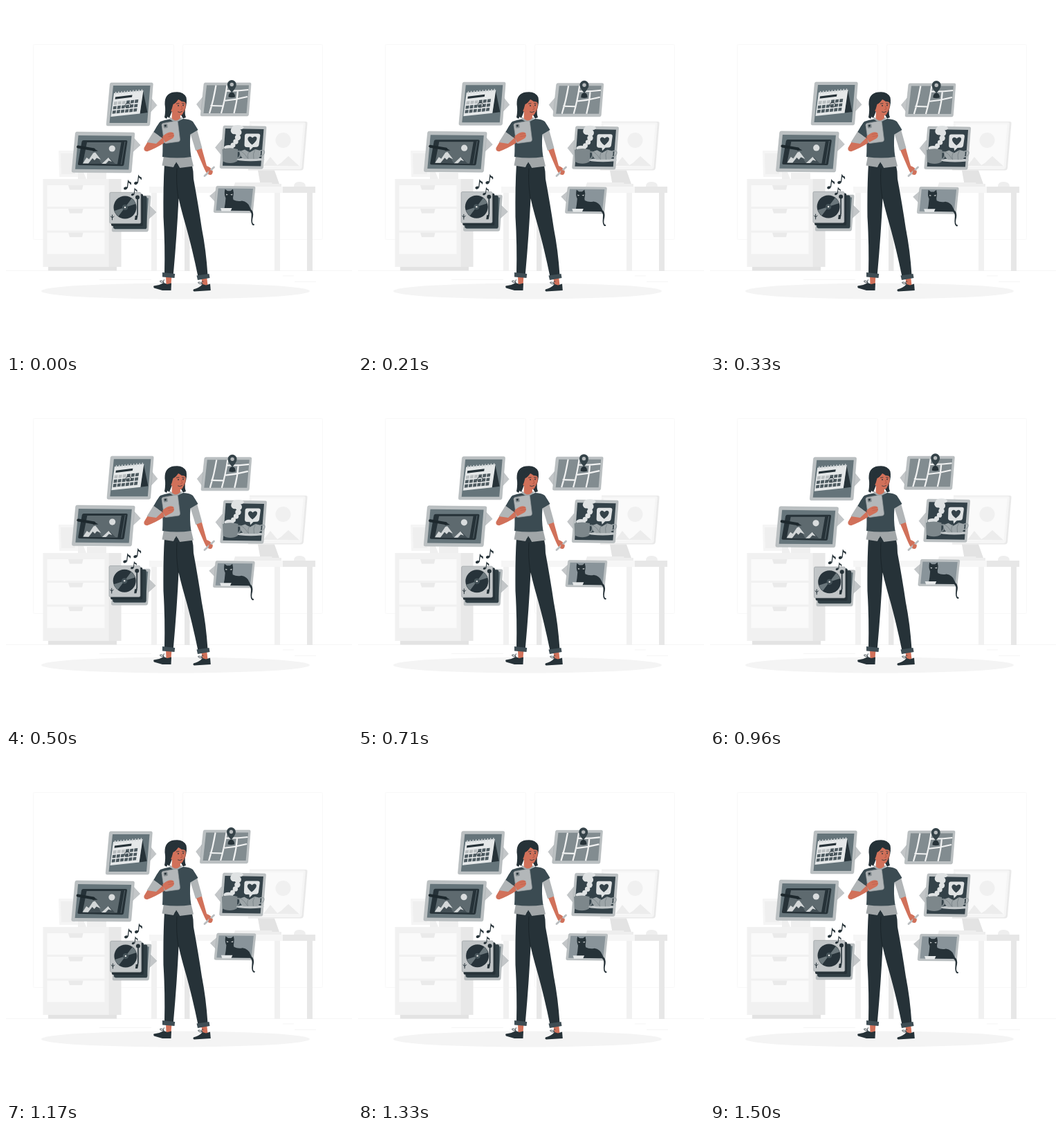
Recreate the animation shown at these times as an HTML page. Size 500 by 500 pixels, loop 1.54 s.

```html
<!DOCTYPE html>
<html lang="en">
<head>
<meta charset="utf-8">
<title>Floating posts</title>
<style>
html, body { margin: 0; width: 100%; height: 100%; overflow: hidden; background: #fff; }
svg { display: block; width: 100%; height: 100%; }
.rim { fill: #bbc0c2; stroke: #a5abad; stroke-width: .5; stroke-linejoin: round; }
.tick { fill: #c3c6c8; stroke: #adb2b4; stroke-width: .5; stroke-linejoin: round; }
.ink { fill: #263238; }
.shirt { fill: #3b4b52; }
.skin { fill: #d1715a; }
.line { fill: none; stroke-linecap: round; stroke-linejoin: round; }
</style>
</head>
<body>
<svg viewBox="0 0 500 500" xmlns="http://www.w3.org/2000/svg">
<defs>
  <g id="note">
    <ellipse cx="0" cy="0" rx="2.7" ry="2" transform="rotate(-18)" class="ink"/>
    <path d="M2 -.5L3.500 -12.500Q5 -9 8 -8.500Q8.800 -6.500 7.700 -4.500Q7 -7 4.200 -8L3.200 0Z" class="ink"/>
  </g>
</defs>

<!-- room -->
<g fill="none" stroke="#f8f8f8">
  <rect x="39.500" y="55.500" width="203" height="282" rx="2"/>
  <rect x="255.500" y="55.500" width="202" height="282" rx="2"/>
</g>
<path d="M0 382.500H500M135 395.500H210M400 390H416M417 398.500H448" stroke="#f5f5f5" fill="none"/>
<ellipse cx="245" cy="412" rx="194" ry="11.500" fill="#f4f4f4"/>

<!-- cabinet -->
<path d="M76 209H104L106 247H77Z" fill="#f5f5f5"/>
<path d="M79 213H100V243H80Z" fill="#efefef"/>
<path d="M104 240H112L116 250H104ZM117 241H145V250H117Z" fill="#efefef"/>
<path d="M61 376H160V382.500H61Z" fill="#e3e3e3"/>
<path d="M148 250H166.500V377H148Z" fill="#e8e8e8"/>
<path d="M53.500 250H148.500V377H53.500Z" fill="#f1f1f1"/>
<path d="M59.500 259H142.500V290H59.500ZM59.500 293H142.500V324.500H59.500ZM59.500 327.500H142.500V358.500H59.500Z" fill="#fafafa"/>
<path d="M90 259H111.500L110 265.500H92ZM90 293H111.500L110 299.500H92ZM90 327.500H111.500L110 334H92Z" fill="#eaeaea"/>

<!-- desk and monitor -->
<path d="M352 167H433Q436 167 435.500 170L430 234Q429.500 237.500 426 237.500H350Z" fill="#e9e9e9"/>
<path d="M352 168H430.500Q433 168 432.700 170.500L427.500 233Q427 236 424 236H350Z" fill="#f5f5f5"/>
<path d="M355 171H429.500L424.500 232H352Z" fill="#fafafa"/>
<circle cx="400.500" cy="194" r="11" fill="#f0f0f0"/>
<path d="M372 231L382 218L392 230L397 227L408 217L424 231.500Z" fill="#ececec"/>
<path d="M364 237.500H388L396 260H368Z" fill="#e3e3e3"/>
<path d="M331 255H384L386 261H329ZM367 257H398V261H367ZM416 261Q416 254 424 254Q433 254 433 261Z" fill="#eeeeee"/>
<path d="M210 270H218V383H210ZM388 270H396V383H388Z" fill="#f1f1f1"/>
<path d="M258 270H265.500V383H258ZM435 270H443V383H435Z" fill="#e7e7e7"/>
<path d="M207 261H400V270H207Z" fill="#f6f6f6"/>
<path d="M400 261H447V270H400Z" fill="#e7e7e7"/>

<!-- woman -->
<g>
  <path class="skin" d="M231 389H239.500L238.500 403H231.500ZM282 391L290 390L291.500 404H284Z"/>
  <path class="ink" d="M213.500 404.500Q222 403.500 228 400L233 402L239 400.500L238.500 411H226L214 407.500Q212.500 406 213.500 404.500ZM271 409.500Q279 407.500 284 402L289 403.500L295 401.500L295.800 411L272 412.500Q269.500 411.500 271 409.500Z"/>
  <path class="line" d="M227 400Q221 399 223 397Q226 396 228 400Q226 395 229 396M283 402Q276 401 278 399Q281 398 284 402Q281 397 285 398" stroke="#263238" stroke-width=".8"/>
  <path class="ink" d="M229 228H268.500Q271 238 271 250Q278 288 283 322Q289 352 291.500 389L277.500 391Q269 350 260 318Q253 294 249.500 278Q247 330 241.800 388L229 387Q230 345 227.500 305Q227 260 229 228Z"/>
  <path class="line" d="M247 235Q245.500 255 249 278" stroke="#1a2429" stroke-width="1"/>
  <path d="M226 385L244.200 387L243.500 393L226 391.500ZM275.500 389.500L293.500 387L294.500 393L277 396Z" fill="#3e4d54"/>
  <path d="M228 217H267.500L271 231.500L251 234L246 225L242 233L225.500 230.500Z" fill="#a1a6a8"/>
  <path class="ink" d="M246 225L251 234H242Z"/>

  <path class="skin" d="M274 206L282.500 204L290 231Q296 233 298.500 238Q299.500 242 296 244Q292 244.500 289 240L286.500 235Z"/>
  <path class="line" d="M287 245.500L300.500 233" stroke="#b9bdbf" stroke-width="2.800"/>
  <path class="skin" d="M294 236L298.500 239L297 243.500L292.500 242Z"/>
  <path d="M266 183L276 178.500L283.500 205.500L274 209Z" fill="#b1b5b7"/>

  <path class="shirt" d="M236.500 163.500Q245 169 256 163Q266 163.500 270 167Q274 173 277.500 179L266.500 185.500Q265 202 267.500 218Q248 221 226 218Q227 203 226 192L213.500 182Q218 173 223 167Q229 164.500 236.500 163.500Z"/>
  <path class="skin" d="M240 151H251.500L252 163Q246 170 239.500 164Z"/>
  <path class="line" d="M237.500 162Q245 171 253.500 162" stroke="#a3a9ab" stroke-width="2"/>

  <path class="skin" d="M215 185L206 194L199.500 205Q198.500 210 204 210.200Q216 206 230 197L242 190L239 181L231 184L221 192Z"/>
  <path d="M213.500 181L225.500 191L217 199L203.500 197Z" fill="#b1b5b7"/>
  <path class="shirt" d="M213.500 182L222 168L228 192Z"/>
  <path d="M227 169.500L246 166Q248 165.800 248.400 168L251.500 193Q251.500 195.500 249.500 196L231 198.500Q229 198.500 228.500 196.500L225 172Q225 170 227 169.500Z" fill="#b3b7b9" stroke="#8e9598" stroke-width=".7"/>
  <rect x="227.500" y="170.500" width="6" height="6" rx="1.500" fill="#828a8e" transform="rotate(-8 230 173)"/>
  <circle cx="230.300" cy="173" r="1.500" class="ink"/>
  <path class="skin" d="M226 189Q230 184 236 182.500Q241 181.500 242.500 184.500Q244 190 239.500 192L230 197Z"/>
  <path class="line" d="M234 185.500L242 184M235 188.500L242.500 187.500" stroke="#b65c49" stroke-width=".6"/>

  <path class="ink" d="M229 161Q231 151 229.500 142Q229 126 243 124.500Q256 122.500 260.500 132Q262 140 259 149Q258 156 260 161L256 162.500L252 156L240 152L236 162L233.500 160L232 163Z"/>
  <path class="skin" d="M238.500 143Q245 140 249 135Q254 138 259.500 139Q260.500 147 258 152.500Q255 158.500 250 158.500Q244 158 241.500 153Q238 153 237.500 149Q237 145 238.500 143Z"/>
  <path class="ink" d="M236 142Q240 128 251 127.500Q260.500 129 260.500 141Q257 137.500 254.500 134Q255 137 254.500 138.500Q251 136.500 249.500 133Q247 139.500 241.500 142L239.500 149L237.500 153Z"/>
  <path class="ink" d="M259.500 144Q256.500 153 258.500 160L256 162.500L254.500 158Q257.500 152 259.500 144Z"/>
  <g class="ink"><circle cx="249" cy="144" r=".9"/><circle cx="256" cy="143.500" r=".9"/></g>
  <path class="line" d="M246.500 141.200L250 140.700M254.500 140.700L257.500 141.200M248.500 153Q251.500 155 254.500 152.500" stroke="#263238" stroke-width=".8"/>
  <path class="line" d="M253.500 144.500L254.800 149L252.500 149.500" stroke="#ad5242" stroke-width=".8"/>
</g>

<g id="calendar">
  <path class="tick" d="M210 133.500L218 143.500L208 154Z"/>
  <path class="rim" d="M152.500 111H210.500Q212.500 111 212.300 113L207.800 171Q207.500 173 205.500 173H147Q145 173 145.200 171L150.300 113Q150.500 111 152.500 111Z"/>
  <path d="M155 115H208.500L204 169H149.500Z" fill="#65747a"/>
  <path class="ink" d="M198 122L204.500 154L193.500 155.500Z"/>
  <path d="M156 126L198.500 122L193.500 155.500L151.500 160Z" fill="#e5e8e9"/>
  <path d="M158 131.500L182.500 128.500L182 131.800L157.600 134.800Z" class="ink"/>
  <g id="days"></g>
  <ellipse cx="176.200" cy="143.800" rx="4" ry="3.400" fill="none" stroke="#263238" stroke-width=".8"/>
</g>

<g id="map">
  <path class="tick" d="M284 132L275.500 142L283 152.500Z"/>
  <path class="rim" d="M288 111H352.500Q354.300 111 354 113L350.500 157Q350.300 159 348.300 159H283Q281 159 281.300 157L286 113Q286.300 111 288 111Z"/>
  <path d="M290 114.500H351L347.500 155H285.500Z" fill="#828c90"/>
  <path d="M303.500 114.500Q300 136 294 155M319.500 114.500Q316 138 311 155M335 121.500Q334 138 329.500 155M295.500 144L313 144.500M314.500 137Q332 135.500 349 131M318 122.500Q334 123 350.300 121" fill="none" stroke="#f0f1f1" stroke-width="2.200"/>
  <path d="M321.500 131.500Q321.500 125 326.300 124.500Q331 125 331 131.500Q326 133 321.500 131.500Z" class="ink"/>
  <path d="M326.300 125Q319.800 118 319.800 113.500A6.500 6.500 0 0 1 332.800 113.500Q332.800 118 326.300 125Z" fill="#354349"/>
  <circle cx="326.300" cy="113.500" r="2.700" fill="#b5b9bb"/>
</g>

<g id="tablet">
  <path class="tick" d="M184 190L194 201L182.500 211.500Z"/>
  <path class="rim" d="M102.500 182L184 183Q186 183 185.800 185L181.200 239Q181 241 179 241L97 240.300Q95 240.300 95.200 238.300L100.300 184Q100.500 182 102.500 182Z"/>
  <path d="M104.500 187L181.500 187.800L177.300 236.500L100 235.800Z" fill="#66757b"/>
  <path class="ink" d="M112 194H173.500Q175.700 194 175.400 196L170.500 229Q170 231.200 168 231.200L106 230Q103.500 230 104 227.500L109.500 196Q110 194 112 194Z"/>
  <path d="M117 197H166.500L161 228.500L111 227.500Z" fill="#5e6a6f"/>
  <path d="M172 196L166.500 229" stroke="#56646a" stroke-width="1"/>
  <circle cx="153.300" cy="206" r="4.600" fill="#d9dcdd"/>
  <path d="M119 227.700L129 212L138 228ZM146 228.100L149 219L158 228.300Z" fill="#434f55"/>
  <path d="M111 227.500L116.500 219L120 221.500L126 212.500L129 211.500L137 222L131 219.500L128 223L125 220L119 227.600ZM138.500 228L148 219L153 225L148.500 223.500L144 228Z" fill="#d3d7d8"/>
  <path class="line" d="M104 203.500L127 207.500" stroke="#1d282d" stroke-width="4"/>
  <path d="M126 205.500L133 209.500L125.500 210Z" fill="#1d282d"/>
</g>

<g id="coffee">
  <path class="tick" d="M312 193L302.500 204.500L310.500 214.500Z"/>
  <path class="rim" d="M316 173L374.500 174Q376.300 174 376 176L371.500 233.300Q371.300 235.200 369.300 235.200L311 234.500Q309 234.500 309.200 232.500L314 175Q314.200 173 316 173Z"/>
  <path d="M317 177L372.500 178L368.300 231.500L313 230.800Z" fill="#344249"/>
  <g fill="#dfe2e3">
    <ellipse cx="335" cy="175.500" rx="8.500" ry="3.500"/>
    <circle cx="330" cy="180" r="5.300"/><circle cx="335.500" cy="182.500" r="5"/>
    <circle cx="335" cy="190" r="4.200"/><circle cx="332" cy="196" r="3.700"/>
    <circle cx="328" cy="201" r="3.500"/><ellipse cx="322" cy="204.500" rx="7" ry="3.600"/>
  </g>
  <path d="M312.500 207Q324 203.500 335 207L334.500 224Q330 227 324 227Q317 227 313 224Z" fill="#7d878b"/>
  <path d="M334 210Q339.500 209 338.500 215Q337.500 220 333.500 220" fill="none" stroke="#7d878b" stroke-width="2"/>
  <path d="M348 184.500H364.500Q367.500 184.500 367.300 187.500L365.500 200.500Q365 203.500 362 203.700L357 204L352.500 208.500L352 204.200L347.500 204Q344.500 203.700 344.500 200.700L345 187.500Q345.200 184.500 348 184.500Z" fill="#dfe2e3"/>
  <path d="M355.600 200.500Q348.500 195 349.400 191Q352 186.500 356 190.500Q360.300 186.500 362.500 190.500Q363 195 355.600 200.500Z" fill="#344249"/>
  <ellipse cx="353.500" cy="221.800" rx="20" ry="2.500" fill="#c3c8ca"/>
  <path d="M338 210L345 207.500L352 211.500L360 207L368 209Q369 217 364 221H344Q338 219 338 210Z" fill="#9da5a8"/>
  <path d="M337 209Q344 211 349 220M351 210Q348 216 350 221M360 207Q356 214 358 221" fill="none" stroke="#7d878b"/>
  <path d="M367 209Q375 207 373 213Q371 217 366 217" fill="none" stroke="#9da5a8" stroke-width="1.500"/>
</g>

<g id="music">
  <path class="tick" d="M207 288L217 298L206 308Z"/>
  <path class="rim" d="M162 274H207.500Q209.300 274 209 276L205.500 324Q205.300 326 203.300 326H155Q153 326 153.200 324L159 276Q159.300 274 162 274Z"/>
  <path d="M163 277.500H206L202.500 322.500H157Z" fill="#65747a"/>
  <rect x="155" y="274.500" width="48.500" height="47.500" rx="2.500" fill="#303e44"/>
  <rect x="152" y="271.500" width="46" height="46.500" rx="2" class="ink"/>
  <rect x="149.800" y="269.300" width="45" height="45" rx="1.800" fill="#c1c5c7" stroke="#8f9699" stroke-width=".6"/>
  <g transform="translate(172 291)">
    <circle r="16.500" fill="#27333a"/>
    <path d="M0 0L9.700 -13A16.200 16.200 0 0 1 15.400 -5ZM0 0L-9.700 13A16.200 16.200 0 0 1 -15.400 5Z" fill="#6b777c"/>
    <circle r="4" fill="#46545a"/>
    <circle r="1.200" fill="#eee"/>
  </g>
  <path d="M190 276V301L188 307" class="line" stroke="#27333a" stroke-width="1.600"/>
  <circle cx="190" cy="276.500" r="3" class="ink"/>
  <path d="M186.800 303H190.500L189.300 309H186Z" class="ink"/>
  <path d="M153.500 302V309M151.500 304Q153.500 308 155.800 304" class="line" stroke="#27333a"/>
  <use href="#note" x="172.700" y="263.300"/>
  <use href="#note" x="187.700" y="256"/>
  <use href="#note" transform="translate(183 272.500) scale(.8)"/>
</g>

<g id="cat">
  <path class="tick" d="M304 266.500L294.500 274.500L302.500 283Z"/>
  <path class="rim" d="M305.500 260.300L358.500 261Q360.300 261 360 263L356.500 297Q356.300 299 354.300 299L302 298.500Q300 298.500 300.200 296.500L303.700 262.300Q303.900 260.300 305.500 260.300Z"/>
  <path d="M306.700 263.500L357 264L353.700 296L303.500 295.500Z" fill="#89949a"/>
  <path class="ink" d="M316.500 264.500L320 267.200H324.500L328 264.500Q329.500 270 328.500 274Q327.500 277 328.500 280Q334 283 341 281.500Q349.500 283 352 290L354 294Q358 297 357 304Q355 312 357 314.500L359 315.500Q359 317.500 357 317Q353.500 315 354.500 306Q355.500 298 352 296L315 295.500Q317 286 317.500 277.500Q314.800 272 316.500 264.500Z"/>
  <path d="M317.800 271.500L321 272.800L318.500 273.500ZM327.500 271.500L324 272.800L326.800 273.500Z" fill="#dfe2e3"/>
  <path d="M310 292H326.500L324.500 296.500H311.500Z" fill="#e5e8e9"/>
</g>
</svg>

<script>
const NS = "http://www.w3.org/2000/svg";
const byId = id => document.getElementById(id);

function shape(parent, d, fill) {
  const el = document.createElementNS(NS, "path");
  el.setAttribute("d", d);
  el.setAttribute("fill", fill);
  parent.append(el);
}

// Calendar: three rows of days and the binding along the top edge
for (let row = 0; row < 3; row++) {
  for (let col = 0; col < 6; col++) {
    const x = 156 + col * 6.1 - row * .9;
    const y = 138.6 + row * 6.3 - col * .6;
    const pale = row === 0 && col < 3;
    shape(byId("days"), `M${x} ${y}l4.800 -.5l-.6 4.600l-4.800 .5Z`, pale ? "#b9bec0" : "#4d5a60");
  }
}
for (let i = 0; i < 10; i++) {
  shape(byId("days"), `M${158 + i * 4.2} ${124 - i * .4}l1.400 -.1l-.4 4l-1.400 .1Z`, "#d3d7d9");
}

// Each card drifts along its own short line
const drift = {
  calendar: [1, -1],
  map: [.9, 1],
  tablet: [.4, -1.1],
  coffee: [.6, 1.1],
  music: [-.9, -1],
  cat: [-.9, 1.3]
};
const cards = Object.entries(drift).map(([id, dir]) => [byId(id), ...dir]);
const LOOP = 1540, SWING = 1500, STEP = 1000 / 24;

function draw(ms) {
  const t = Math.floor((ms % LOOP + 5) / STEP) * STEP;
  const s = Math.sin(t / SWING * 2 * Math.PI);
  for (const [el, dx, dy] of cards) {
    el.setAttribute("transform", `translate(${dx * s} ${dy * s})`);
  }
}

const start = performance.now();
function tick() {
  draw(performance.now() - start);
  requestAnimationFrame(tick);
}
tick();
</script>
</body>
</html>
```
